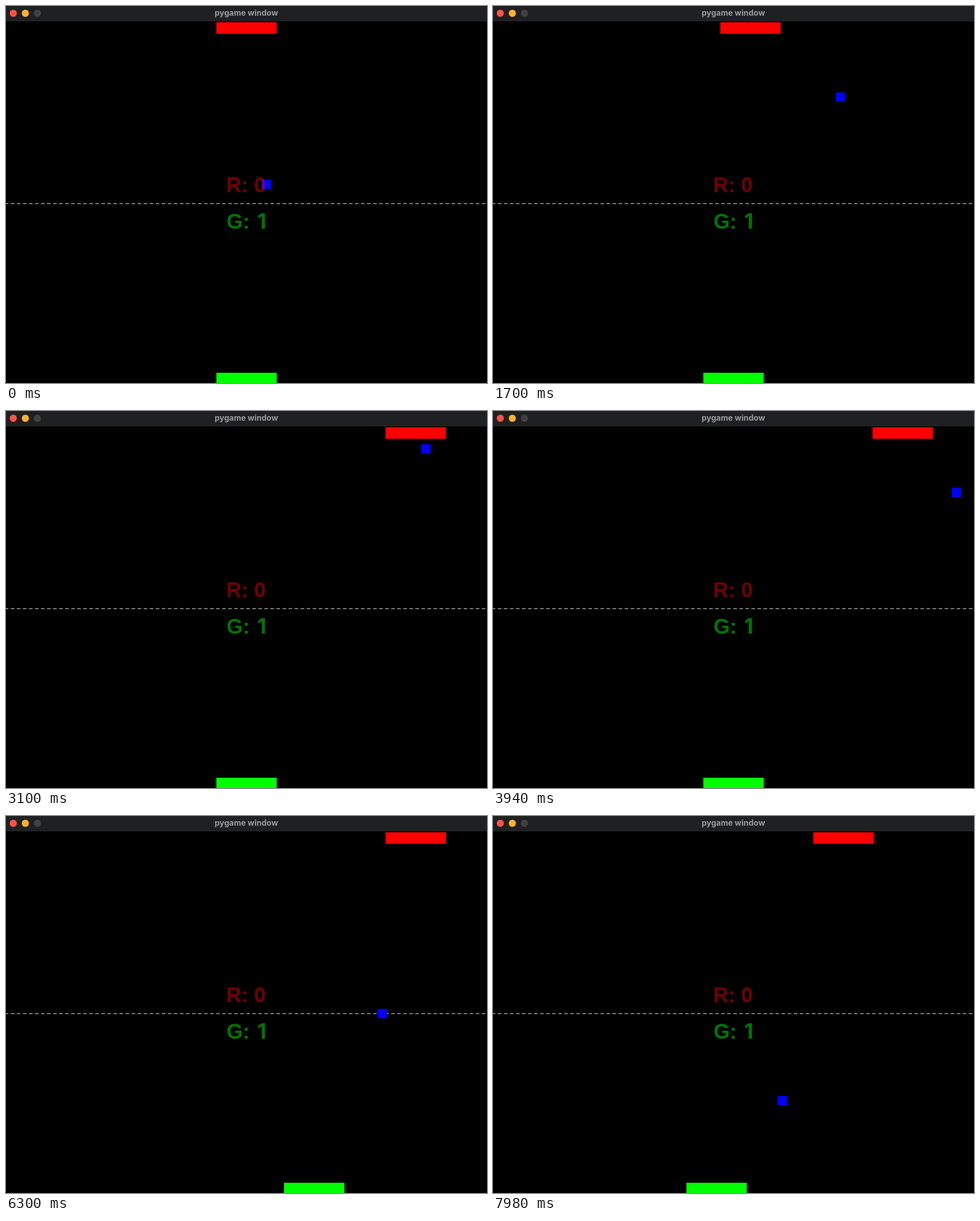
Recreate the animation shown at these times as an HTML page. Size 846 by 662 pixels, loop 8000 ms.

```html
<!DOCTYPE html>
<html lang="en">
<head>
<meta charset="utf-8">
<title>pygame window</title>
<style>
  html, body { margin: 0; width: 100%; height: 100%; overflow: hidden; background: #000; }
  svg { display: block; width: 100vw; height: 100vh; }
  .title { font: 700 14px Inter, sans-serif; fill: #9b9b9b; text-anchor: middle; }
  .score { font: 700 36.7px "Liberation Sans", Arial, sans-serif; }
  .one { font: 700 37px Inter, sans-serif; text-anchor: end; }
</style>
</head>
<body>
<svg viewBox="0 0 846 662">
  <rect width="846" height="662" fill="#000"/>
  <rect width="846" height="27" fill="#1f2021"/>
  <circle cx="12.8" cy="12.8" r="6.3" fill="#ff5147"/>
  <circle cx="34" cy="12.8" r="6.3" fill="#ffb12c"/>
  <circle cx="55.2" cy="12.8" r="6.3" fill="#40403f"/>
  <text class="title" x="422.8" y="17">pygame window</text>
  <path d="M0 347H846" stroke="#a4a4a4" stroke-width="1.6" stroke-dasharray="6.4 4.22" stroke-dashoffset="2.2"/>
  <rect id="red" y="28.5" width="106.2" height="20.3" fill="#fe0000"/>
  <rect id="green" y="644" width="106.2" height="18" fill="#0f0"/>
  <rect id="ball" width="16.4" height="16.4" fill="#00f"/>
  <g fill="#f00" fill-opacity=".44">
    <text class="score" x="387.6" y="327">R: 0</text>
  </g>
  <g fill="#0f0" fill-opacity=".46">
    <text class="score" x="388" y="390.5">G:</text>
    <text class="one" x="458" y="390.5">1</text>
  </g>
</svg>
<script>
const LOOP = 8000;
const TICK = 95;            // ms per ball step
const LEAD = 55;            // ms of the first tick already gone
const BALL_STEP = 8.5;
const PADDLE_STEP = 14.88;
const TOP_HIT = 31;         // step at which the ball meets the red paddle
const WALL_HIT = 45;        // step at which it meets the right wall

const [red, green, ball] = ["red", "green", "ball"].map(id => document.getElementById(id));

// Distance travelled along one axis, turning back at step `hit`.
const travel = (n, hit) => BALL_STEP * (hit - Math.abs(hit - n));

// Whole paddle steps made while a key is held from `from` to `to`.
function held(t, from, to, steps) {
  const p = Math.min(1, Math.max(0, (t - from) / (to - from)));
  return Math.trunc(steps * p);
}

const paddleX = steps => 370 + PADDLE_STEP * steps;

function draw(t) {
  const n = Math.floor((t + LEAD) / TICK);
  ball.setAttribute("x", 449.8 + travel(n, WALL_HIT));
  ball.setAttribute("y", 304.8 - travel(n, TOP_HIT));

  red.setAttribute("x", paddleX(
    held(t, 1100, 1200, -2) + held(t, 1470, 2680, 22) + held(t, 7200, 7980, -7)));
  green.setAttribute("x", paddleX(
    held(t, 4060, 4760, 8) + held(t, 6500, 7480, -10)));
}

const start = performance.now();
function tick() {
  draw((performance.now() - start) % LOOP);
  requestAnimationFrame(tick);
}
tick();
</script>
</body>
</html>
```
